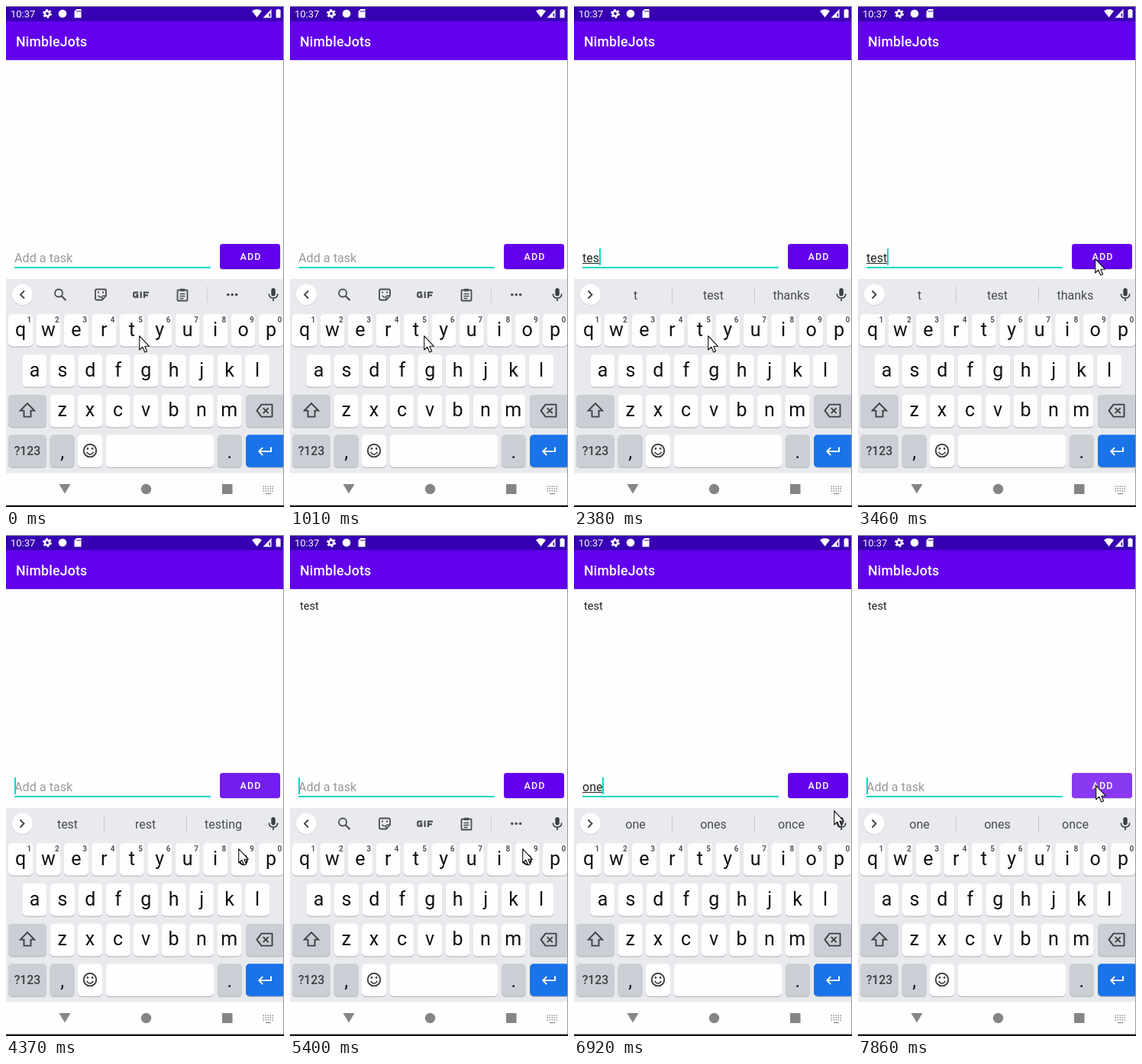
Recreate the animation shown at these times as an HTML page. Size 364 px wide and 657 px high, loop 8 s.

```html
<!DOCTYPE html>
<html lang="en">
<head>
<meta charset="utf-8">
<style>
html, body { margin: 0; width: 100%; height: 100%; overflow: hidden; background: #fff; }
svg { display: block; width: 364px; height: 657px; font-family: Roboto, sans-serif; }
</style>
</head>
<body>
<svg id="stage" viewBox="0 0 364 657" xmlns="http://www.w3.org/2000/svg">
  <rect width="364" height="657" fill="#fefefe"/>

  <!-- status bar and app bar -->
  <rect width="364" height="21" fill="#3700b3"/>
  <rect y="20" width="364" height="51" fill="#6200ee"/>
  <text x="6" y="14.700" font-size="13" fill="#fff">10:37</text>
  <g fill="#fff">
    <circle cx="54" cy="10" r="3.200" fill="none" stroke="#fff" stroke-width="2.600"/>
    <circle cx="54" cy="10" r="5" fill="none" stroke="#fff" stroke-width="2" stroke-dasharray="2.600 2.636"/>
    <circle cx="74" cy="10" r="5.300"/>
    <path d="M92.500 4H98.500V15.500H89.500V7Z"/>
    <path d="M93 6v2M95 6v2M97 6v2" stroke="#3700b3"/>
    <path d="M322 6.500Q328.500 1.800 335 6.500L328.500 15Z"/>
    <path d="M347.500 4V15.500H336.500Z"/>
    <path d="M346 9V14H344.500V10.500Z" fill="#3700b3"/>
    <path d="M353.500 5h1.500V4h3v1H359.500V15.500H353.500Z"/>
  </g>
  <text x="13" y="52.500" font-size="17.700" font-weight="500" letter-spacing=".2" fill="#fff">NimbleJots</text>

  <!-- list and entry row -->
  <text id="item" x="13" y="98" font-size="14.600" fill="#222">test</text>
  <text id="hint" x="11" y="335.700" font-size="16.200" fill="#9a9a9a">Add a task</text>
  <text id="typed" x="11" y="335.700" font-size="16" fill="#222"></text>
  <rect id="under" x="11" y="337" height="1" fill="#222"/>
  <rect x="11" y="342" width="257" height="2" fill="#03dac5"/>
  <rect id="caret" y="318" width="2" height="22" fill="#03dac5"/>
  <rect x="280.500" y="313" width="78.500" height="33" rx="4" fill="#000" opacity=".14"/>
  <rect id="button" x="280" y="312" width="79" height="33" rx="3.500"/>
  <text x="320.500" y="333" font-size="12.500" font-weight="500" letter-spacing="1.100" text-anchor="middle" fill="#fff">ADD</text>

  <!-- keyboard -->
  <rect y="358" width="364" height="255" fill="#e8eaed"/>
  <circle cx="21.500" cy="379" r="14" fill="#000" opacity=".1"/>
  <circle cx="21.500" cy="378.300" r="13.600" fill="#fff"/>
  <path id="chevron" fill="none" stroke="#3c4043" stroke-width="1.800"/>
  <g id="tools" fill="none" stroke="#4a4d51" stroke-width="1.800">
    <circle cx="69" cy="376.500" r="5"/>
    <path d="M72.700 380.200L78.500 386" stroke-width="2.200"/>
    <path d="M119 371.500H129Q131 371.500 131 373.500V380L126 385.500H119Q117 385.500 117 383.500V373.500Q117 371.500 119 371.500Z"/>
    <path d="M130.500 380H127.500Q126 380 126 381.500V385M120.500 379.500Q122 382.500 125 381.500" stroke-width="1.500"/>
    <path d="M120 375.500h2M126 375.500h2" stroke-width="2"/>
    <path d="M173 375.700H168.800Q167.200 375.700 167.200 377.300V380Q167.200 381.700 168.800 381.700H172.200V378.700H170.300M176.700 374.500V382.900M181 382.900V375.700H187M181 379.300H186" stroke-width="2.200"/>
    <rect x="224.500" y="372.500" width="13" height="14" rx="1"/>
    <path d="M227.500 377.500h7M227.500 380.500h7M227.500 383.500h5" stroke-width="1.300"/>
    <path d="M228 372.500h6" stroke-width="3.500"/>
    <path d="M263.500 368V389" stroke="#cfd1d4" stroke-width="1"/>
    <path d="M290.800 378.500h.01M296.200 378.500h.01M301.600 378.500h.01" stroke-width="3.600" stroke-linecap="round"/>
  </g>
  <g id="words" font-size="16" fill="#484b4f" text-anchor="middle">
    <path d="M128.500 368V389M236.500 368V389" stroke="#c6c8cb"/>
    <text x="80.500" y="385"></text>
    <text x="182.500" y="385"></text>
    <text x="284.500" y="385"></text>
  </g>
  <g fill="none" stroke="#3c4043" stroke-width="1.700">
    <rect x="347.300" y="370" width="5.400" height="10.500" rx="2.700" fill="#3c4043" stroke="none"/>
    <path d="M344.300 377.500Q344.500 383 350 383Q355.500 383 355.700 377.500M350 383V387"/>
  </g>
  <g id="keys"></g>
  <g fill="none" stroke="#3c4043" stroke-width="1.900" transform="translate(0 -.4)">
    <path d="M28 521.500L37.200 531H32.500V539H23.500V531H18.800Z"/>
    <path d="M334.500 523H348.500V539H334.500L328.500 531Z" stroke-linejoin="round"/>
    <path d="M336.700 527.500L343.700 534.500M343.700 527.500L336.700 534.500"/>
    <circle cx="110" cy="583.500" r="8.300"/>
    <path d="M105.500 585.500Q110 591.500 114.500 585.500" stroke-width="1.600"/>
    <path d="M106.900 580.800h.01M113.100 580.800h.01" stroke-width="2.800" stroke-linecap="round"/>
    <path d="M347 579V584.500H331.500M336.200 579.500L331.200 584.500L336.200 589.500" stroke="#fff"/>
  </g>

  <!-- navigation bar -->
  <rect y="612.500" width="364" height="43" fill="#fefefe"/>
  <rect y="654.700" width="364" height="2.300" fill="#111"/>
  <g fill="#858585">
    <path d="M69.500 627H84.500L77 639.500Z"/>
    <circle cx="183.500" cy="633.500" r="6.700"/>
    <rect x="283" y="627" width="13.500" height="13"/>
  </g>
  <path d="M336.500 630H350M336.500 633H350M336.500 636H350" stroke="#8e8e8e" stroke-width="1.500" stroke-dasharray="1.500 1.500"/>
  <path d="M340 639.500H347" stroke="#8e8e8e" stroke-width="1.300"/>

  <!-- window edge -->
  <path d="M0 .5H363.500V655" fill="none" stroke="#999"/>

  <path id="mouse" d="M.7 .7V19L4.800 15.200L7.800 22L10.600 20.700L7.800 14.200H13.300Z" fill="#fff" stroke="#111" stroke-width="1.100" stroke-linejoin="round"/>
</svg>
<script>
const LOOP = 8000;
const $ = id => document.getElementById(id);
const keys = $('keys');

function add(tag, attrs, text) {
  const el = document.createElementNS('http://www.w3.org/2000/svg', tag);
  for (const k in attrs) el.setAttribute(k, attrs[k]);
  if (text) el.textContent = text;
  keys.append(el);
}

function key(x, y, w, fill, label, dy = 28.6) {
  add('rect', { x, y: y + 1, width: w, height: 42.7, rx: 5, fill: '#000', opacity: .2 });
  add('rect', { x, y, width: w, height: 42.5, rx: 5, fill });
  if (label) add('text', {
    x: x + w / 2, y: y + dy, 'font-size': 25, 'text-anchor': 'middle', fill: '#111'
  }, label);
}

const PITCH = 36.45, WHITE = '#fefefe', GREY = '#cbced5';
const ROWS = [404, 457, 509.7, 562.2];
[['qwertyuiop', 3], ['asdfghjkl', 21.5], ['zxcvbnm', 57.6]].forEach(([row, x0], r) => {
  [...row].forEach((ch, i) => key(x0 + i * PITCH, ROWS[r], 32, WHITE, ch));
});
for (let i = 0; i < 10; i++) add('text', {
  x: 30.3 + i * PITCH, y: 414.5, 'font-size': 10, 'font-weight': 600, 'text-anchor': 'middle', fill: '#55585c'
}, String((i + 1) % 10));
key(3, ROWS[2], 50, GREY);
key(314, ROWS[2], 52, GREY);
key(3, ROWS[3], 50, GREY);
add('text', { x: 28, y: 589, 'font-size': 15.8, 'font-weight': 500, 'text-anchor': 'middle', fill: '#3c4043' }, '?123');
key(57.6, ROWS[3], 32, GREY, ',', 30.5);
key(94, ROWS[3], 32, WHITE);
key(130.5, ROWS[3], 141.5, WHITE);
key(276.8, ROWS[3], 32, GREY, '.', 30.5);
key(314, ROWS[3], 52, '#1a73e8');

// Each track lists [start, value]; values hold until the next start.
const typing = [[0, ''], [1530, 't'], [2260, 'te'], [2380, 'tes'], [2770, 'test'], [4100, ''],
  [5770, 'o'], [5890, 'on'], [6010, 'one'], [7860, '']];
const caret = [[0, 0], [390, 1], [1010, 0], [1530, 1], [1830, 0], [2260, 1], [3580, 0], [4100, 1],
  [4800, 0], [5260, 1], [5650, 0], [5770, 1], [7040, 0], [7860, 1]];
const words = [[0, ''], [1980, 't test thanks'], [3700, 'test rest testing'], [5400, ''], [6410, 'one ones once']];
const mouse = [[0, '174,432'], [510, '175,432'], [3060, '274,301'], [3200, '275,298'], [3340, '308,322'],
  [3460, '310,331'], [4100, '309,352'], [4230, '304,411'], [6800, '332,417'], [6920, '340,361'],
  [7040, '318,335'], [7160, '311,328']];
const button = [[0, '#6200ee'], [3970, '#7822f0'], [4100, '#873af1'], [4230, '#8030f1'], [4370, '#731df0'],
  [4490, '#6200ee'], [7470, '#7822f0'], [7600, '#873af1']];
const listed = [[0, 0], [4670, 1]];

const at = (track, t) => track.reduce((v, [start, next]) => t >= start ? next : v, track[0][1]);
const show = (id, on) => $(id).setAttribute('visibility', on ? 'visible' : 'hidden');
const labels = document.querySelectorAll('#words text');

function draw(t) {
  const text = at(typing, t), tips = at(words, t);
  $('typed').textContent = text;
  const width = text ? $('typed').getComputedTextLength() : 0;
  $('under').setAttribute('width', width);
  $('caret').setAttribute('x', Math.round(11 + width));
  show('caret', at(caret, t));
  show('hint', !text);
  show('item', at(listed, t));
  show('tools', !tips);
  show('words', tips);
  tips.split(' ').forEach((word, i) => labels[i].textContent = word);
  $('chevron').setAttribute('d', tips ? 'M18.500 373.500L23.500 378.500L18.500 383.500' : 'M24 373.500L19 378.500L24 383.500');
  $('button').setAttribute('fill', at(button, t));
  $('mouse').setAttribute('transform', `translate(${at(mouse, t)})`);
}

const begin = performance.now();
function tick() {
  draw((performance.now() - begin) % LOOP);
  requestAnimationFrame(tick);
}
tick();
</script>
</body>
</html>
```
